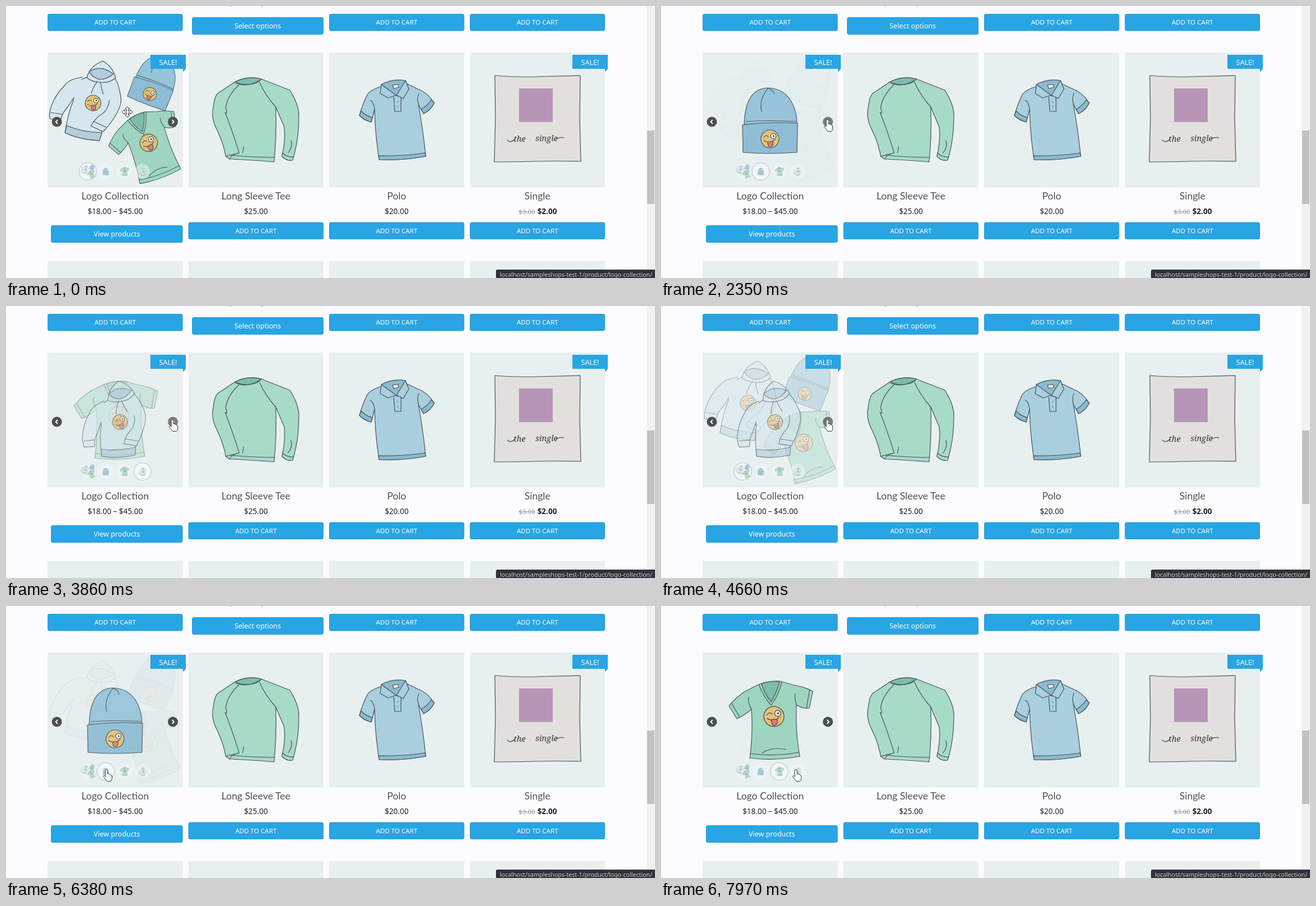
Write an HTML page that moves like this. It is 1155 px wide and 485 px high and loops after 8000 ms.

```html
<!DOCTYPE html>
<html lang="en">
<head>
<meta charset="utf-8">
<style>
  html, body { margin: 0; width: 100%; height: 100%; overflow: hidden; background: #fcfcff; }
  svg { display: block; width: 1155px; height: 485px; }
  text { font-family: "Noto Sans", sans-serif; text-anchor: middle; }
  .button { fill: #fff; }
  .title { font: 17.6px Lato, sans-serif; fill: #55524e; }
  .price { font-size: 13.5px; fill: #222; }
  .ink { stroke: #46545c; stroke-width: 1.2; stroke-linejoin: round; stroke-linecap: round; }
  .line { fill: none; }
  .mint { fill: #a8dac8; }
  .mintDark { fill: #7cbcaa; }
  .blue { fill: #a9cfde; }
  .blueDark { fill: #8bb9cd; }
  .sky { fill: #d5e6ee; }
  .skyDark { fill: #b3cddb; }
</style>
</head>
<body>
<svg id="stage" viewBox="0 0 1155 485">
  <defs>
    <g id="face" class="ink">
      <circle r="16" fill="#e4c174"/>
      <path class="line" d="M-11-3q4-5 8-1M-11 3q11 7 20-2"/>
      <circle cx="6" cy="-5" r="4.8" fill="#f5f2e8"/>
      <circle cx="6.5" cy="-5" r="1" fill="#333"/>
      <path d="M-4 5q0 11 6 9q5-2 3-10z" fill="#d77b78"/>
    </g>
    <g id="beanie" class="ink">
      <path fill="#95c3da" d="M148 211C149 178 158 147 190 146C226 147 241 177 242 210Z"/>
      <path fill="#8dbcd5" d="M145 212Q194 206 243 209L242 261Q190 265 146 261Z"/>
      <path class="line" d="M190 147Q174 168 179 188M191 147Q200 150 201 157M151 206Q195 203 240 206"/>
      <use href="#face" x="194" y="237"/>
    </g>
    <g id="tee" class="ink">
      <path fill="#9ed5c0" d="M174 140L150 152Q133 163 121 178L135 201Q150 194 161 184Q164 230 158 271Q200 277 247 268Q239 225 241 176Q252 184 264 182L270 152Q252 143 236 141L212 134Q190 133 174 140Z"/>
      <path class="mintDark" d="M179 139Q192 133 211 135Q206 155 196 171Q184 157 179 139Z"/>
      <path class="line" d="M174 140Q183 163 196 177Q209 160 215 135M126 174L140 198M259 182L264 151M161 184Q154 172 156 163M241 176Q237 165 239 156M159 263Q200 269 245 261M180 262Q200 250 222 256"/>
      <use href="#face" transform="translate(201 197) scale(1.12)"/>
    </g>
    <g id="tiltedHoodie" class="ink">
      <path class="sky" d="M144 127Q128 133 116 142L120 168Q110 192 105 226Q130 238 166 240L176 205L190 150Q194 138 190 126Z"/>
      <path class="sky" d="M136 127Q112 130 104 142Q88 158 81 178Q76 190 78 201L97 205Q100 190 110 180L121 163"/>
      <path class="sky" d="M192 126Q200 136 204 160Q207 174 198 190Q188 208 173 224L151 214Q160 198 172 192Q182 184 184 168"/>
      <path class="sky" d="M144 128Q148 108 172 98Q190 108 195 128Q184 138 168 136Q154 136 144 128Z"/>
      <path class="skyDark" d="M148 117Q168 104 191 121Q180 131 166 131Q153 127 148 117Z"/>
      <path class="skyDark" d="M108 213Q135 225 171 226L166 240Q130 238 105 226Z"/>
      <path class="line" d="M163 134Q154 146 152 156M168 136Q170 148 173 157M80 190L100 193M156 206L178 216"/>
      <use href="#face" transform="translate(155 173) scale(.88)"/>
    </g>
    <g id="hoodie">
      <use href="#tiltedHoodie" transform="translate(203 207) rotate(-15) scale(.95) translate(-155 -173)"/>
    </g>
    <g id="collection">
      <use href="#tiltedHoodie"/>
      <use href="#beanie" transform="translate(256 157) rotate(21) scale(.75) translate(-194 -237)"/>
      <use href="#tee" transform="translate(254 244) rotate(-18) scale(.87) translate(-201 -197)"/>
    </g>
  </defs>
  <g id="shop"></g>

  <g class="ink">
    <path class="mint" d="M408 135Q430 124 454 130L505 150Q523 178 521 200Q521 240 510 275Q499 277 491 268Q498 240 495 215L480 180Q482 230 477 278Q430 274 398 273L391 268Q388 248 376 222Q364 200 369 180Q371 160 378 155Z"/>
    <path class="mintDark" d="M408 135Q430 124 454 130Q450 138 432 140Q417 141 408 135Z"/>
    <path class="line" d="M408 137Q430 147 454 131M414 141Q394 160 391 181Q395 195 390 190Q402 220 415 262L391 268M451 136Q462 160 480 180M415 262Q400 266 398 273M399 266Q440 270 478 270M492 262Q500 270 512 269M502 262Q511 250 507 240M421 262L423 251"/>
  </g>
  <g class="ink">
    <path class="blue" d="M669 143Q648 150 643 158Q635 174 629 195Q636 203 650 207L656 184Q657 230 664 274Q706 276 747 268Q742 220 734 176L743 192Q756 186 762 173Q750 154 733 148L712 138Z"/>
    <path class="blueDark" d="M629 195Q636 203 650 207L652 199Q640 196 632 187ZM743 192Q756 186 762 173L757 167Q750 178 739 184ZM664 274Q706 276 747 268L746 262Q706 268 663 267Z"/>
    <path class="blueDark" d="M668 140Q688 129 711 133L714 146L697 161L672 150Z"/>
    <path class="blue" d="M668 140L666 156L680 164L694 159ZM711 133L717 148L707 165L695 159Z"/>
    <path fill="#f3f5f5" d="M688 141l10-1l1 5l-9 2z"/>
    <path class="line" d="M690 162L692 188L703 188L703 162M656 184Q654 170 648 168M734 176Q731 162 735 156"/>
    <path d="M697 170v1M697 179v1"/>
  </g>
  <g class="ink">
    <path fill="#e1e0dd" d="M870 124Q905 127 945 126T1022 124L1021 200L1023 277Q980 276 940 277T869 278L871 200Z"/>
    <path class="line" d="M892 239q6 6 13-1M979 238q6-5 14-3"/>
  </g>
  <rect x="913" y="147" width="60" height="60" fill="#b795b6"/>
  <g style="font:italic 14.5px 'Noto Serif',serif" fill="#333">
    <text x="914" y="242" style="font:inherit">the</text>
    <text x="962" y="241" style="font:inherit">single</text>
  </g>

  <use class="slide" href="#collection"/>
  <use class="slide" href="#beanie"/>
  <use class="slide" href="#tee"/>
  <use class="slide" href="#hoodie"/>
  <g id="controls"></g>

  <path d="M872 485V473q0-3 3-3H1155V485Z" fill="#2f3338"/>
  <text x="879" y="483" style="text-anchor:start;font-size:10.65px" fill="#c6cace">localhost/sampleshops-test-1/product/logo-collection/</text>
  <path fill="#f1f1f1" d="M1140 0h15v470h-15z"/>
  <path fill="#c1c1c1" d="M1141 222h13v131h-13z"/>

  <g id="cursor" fill="#fff" stroke="#333">
    <path id="hand" d="M-2 1.5a2 2 0 0 1 4 0v6l1-.5q2 0 2.2 1.3q2-.4 2.4 1.3q2-.2 2 1.8v4q0 3-2 5h-7q-2-3-5.5-7q-1.5-2 .3-2.6q1.6-.2 2.6 1.6z"/>
    <path id="move" d="M0-9.5L4-5H1.5V-1.5H5V-4L9.5 0L5 4V1.5H1.5V5H4L0 9.5L-4 5H-1.5V1.5H-5V4L-9.5 0L-5-4V-1.5H-1.5V-5H-4Z"/>
  </g>
</svg>
<script>
const $ = id => document.getElementById(id);
const text = (x, y, cls, s, size = '') =>
  `<text x="${x}" y="${y}" class="${cls}" ${size && `style="font-size:${size}px"`}>${s}</text>`;

function button(x, y, w, h, label, size) {
  return `<rect x="${x + .5}" y="${y + .5}" width="${w - 1}" height="${h - 1}" rx="2.5" fill="#28a5e4" stroke="#2399d6"/>
    ${text(x + w / 2, y + h / 2 + 4.2, 'button', label, size)}`;
}
const addToCart = (x, y) => button(x, y, 240.5, 30.5, 'ADD TO CART', 11.55);
const badge = x => `<path fill="#28a5e4" d="M${x} 87h63v25h-63z"/>
  <path fill="#2399d6" d="M${x + 58} 112h5l-5 5.5z"/>` + text(x + 31.5, 104.5, 'button', 'SALE!', 12.6);

const products = [
  ['Logo Collection', '$18.00 – $45.00'], ['Long Sleeve Tee', '$25.00'],
  ['Polo', '$20.00'], ['Single', '']
];
$('shop').innerHTML = products.map(([name, price], i) => {
  const x = 74 + 250.5 * i, mid = x + 120.25;
  return `<path fill="#e8efef" d="M${x} 83h240.5v240.5h-240.5zM${x} 454.5h240.5v31h-240.5z"/>`
    + (i === 1 ? button(331, 20, 234, 31, 'Select options', 12.6) + text(mid, -.5, 'price', '$18.00 – $45.00') : addToCart(x, 14))
    + (i ? addToCart(x, 385.5) : button(80, 391, 234.5, 31, 'View products', 12.5))
    + text(mid, 345, 'title', name) + text(mid, 371, 'price', price);
}).join('')
  + '<text x="927" y="371" fill="#999" font-size="11.4" text-decoration="line-through">$3.00</text>'
  + '<text x="963" y="371" class="price" font-weight="700">$2.00</text>' + badge(1008);

const slideIds = ['collection', 'beanie', 'tee', 'hoodie'];
const thumbX = [145.5, 177.5, 210.5, 243];
const arrow = (x, dir) => `<g class="arrow"><circle cx="${x}" cy="206.5" r="9" fill="#4d4d4d"/>
  <path d="M${x - dir * 1.5} 203l${dir * 3.5} 3.5l${-dir * 3.5} 3.5" fill="none" stroke="#fff" stroke-width="1.8"/></g>`;
$('controls').innerHTML = badge(257) + arrow(90.5, -1) + arrow(297, 1)
  + slideIds.map((id, i) => `<g class="thumb" transform="translate(${thumbX[i]} 295)">
    <circle/><use href="#${id}" transform="scale(.11) translate(-194 -203)" opacity=".75"/></g>`).join('');

const slides = [...document.querySelectorAll('.slide')];
const rings = [...document.querySelectorAll('.thumb circle')];
const nextArrow = document.querySelectorAll('.arrow')[1];

const LOOP = 8000, FADE = 500;
// [time, slide]
const clicks = [[-FADE, 0], [1960, 1], [2830, 2], [3700, 3], [4570, 0], [6050, 1], [7530, 2]];
// [start, end, x, y]
const moves = [[350, 1150, 296, 203], [4800, 5450, 179, 292], [6700, 7250, 212, 293], [7600, 7900, 240, 292]];

function pointer(t) {
  let x = 216, y = 189;
  for (const [start, end, toX, toY] of moves) {
    const p = Math.min(1, Math.max(0, (t - start) / (end - start)));
    const e = p * p * (3 - 2 * p);
    x += (toX - x) * e;
    y += (toY - y) * e;
  }
  return [x, y];
}

function draw(t) {
  const n = clicks.filter(c => c[0] <= t).length - 1;
  const [since, active] = clicks[n];
  const previous = n ? clicks[n - 1][1] : -1;
  const fade = 1 - (1 - Math.min(1, (t - since) / FADE)) ** 2.3;
  slides.forEach((s, i) => s.setAttribute('opacity', i === active ? fade : i === previous ? 1 - fade : 0));
  rings.forEach((ring, i) => {
    const on = i === active;
    ring.setAttribute('r', on ? 15.5 : 13.5);
    ring.setAttribute('fill', on ? 'rgba(243,246,247,.9)' : 'rgba(245,248,250,.45)');
    ring.setAttribute('stroke', on ? '#ccd3d6' : 'none');
    ring.setAttribute('stroke-width', 1.6);
  });

  const [x, y] = pointer(t);
  const onArrow = Math.hypot(x - 297, y - 206.5) < 10;
  const onTarget = onArrow || y > 279;
  nextArrow.setAttribute('opacity', onArrow ? .7 : 1);
  $('cursor').setAttribute('transform', `translate(${x} ${y})`);
  $('hand').setAttribute('opacity', onTarget ? 1 : 0);
  $('move').setAttribute('opacity', onTarget ? 0 : 1);
}

const begin = performance.now();
function tick() {
  draw((performance.now() - begin) % LOOP);
  requestAnimationFrame(tick);
}
tick();
</script>
</body>
</html>
```
